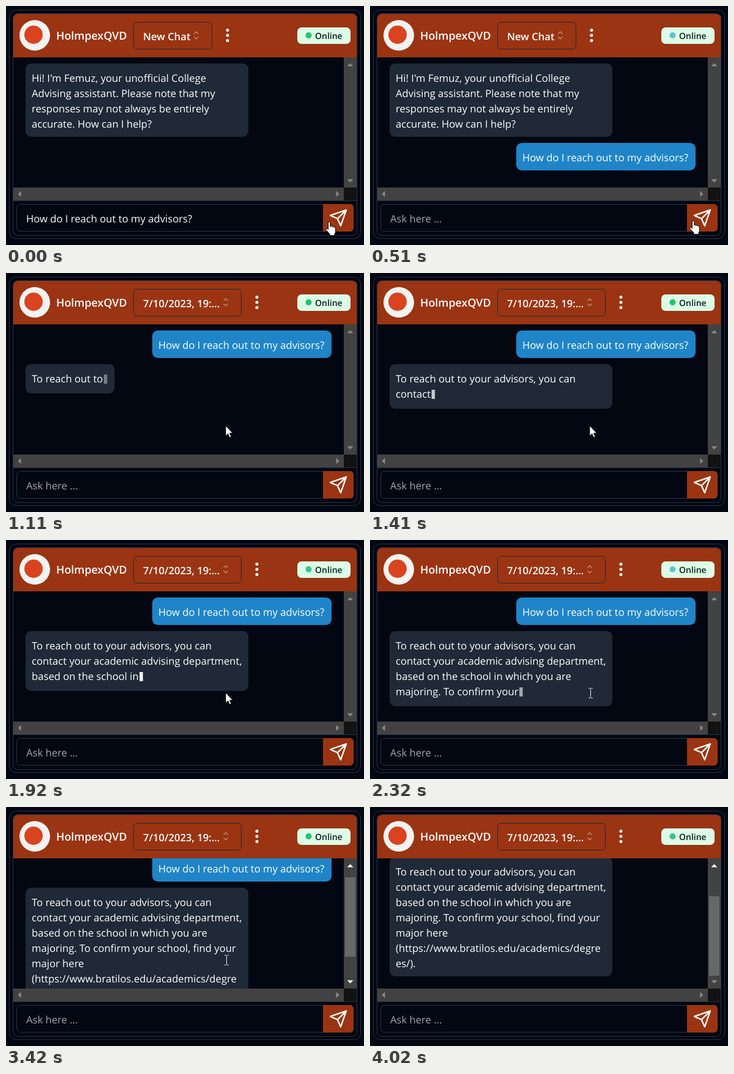
An HTML page for the animation above (4120 ms loop, 585 by 391 pixels).

```html
<!DOCTYPE html>
<html lang="en">
<head>
<meta charset="utf-8">
<title>Chat assistant</title>
<style>
  html, body { margin: 0; width: 100%; height: 100%; overflow: hidden; background: #030712; }
  svg { display: block; }
  text { font: 16.65px "Open Sans", "Noto Sans", sans-serif; fill: #fff; text-rendering: geometricPrecision; }
  .bold { font-weight: 600; }
  .line { fill: none; stroke: #283344; }
  .icon { fill: none; stroke: #fff; stroke-width: 1.8; stroke-linejoin: round; stroke-linecap: round; }
</style>
</head>
<body>
<svg width="585" height="391" viewBox="0 0 585 391">
  <defs>
    <clipPath id="view"><rect x="12" y="84" width="540" height="213"/></clipPath>
    <path id="tri" d="M-5 2.5L0-2.5 5 2.5z"/>
  </defs>
  <rect class="line" x="5.5" y="6.5" width="574" height="374" rx="11"/>

  <path d="M12 84V20a7 7 0 0 1 7-7H567a7 7 0 0 1 7 7V84z" fill="#9a3412"/>
  <circle cx="47" cy="48" r="25" fill="#f5f3f1"/>
  <circle cx="45" cy="47" r="15" fill="#d9431f"/>
  <text class="bold" x="82" y="55" style="font-size:17.9px">HolmpexQVD</text>
  <rect id="select" x="208.5" y="26.5" height="44" rx="6" fill="none" stroke="#1f2937"/>
  <text id="chatName" class="bold" x="224" y="55.5"></text>
  <g id="menu">
    <path d="M-4 45.5L-.5 42 3 45.5M-4 50.5L-.5 54 3 50.5" fill="none" stroke="#c49a8a" stroke-width="1.2"/>
    <g fill="#fff">
      <circle cx="50.5" cy="39.5" r="2.5"/><circle cx="50.5" cy="48" r="2.5"/><circle cx="50.5" cy="56.500" r="2.5"/>
    </g>
  </g>
  <rect x="476" y="35" width="87" height="27" rx="7" fill="#dcfce7"/>
  <circle id="dot" cx="494.5" cy="48" r="5"/>
  <text class="bold" x="505" y="53.5" style="font-size:14px;fill:#0b1f1a">Online</text>

  <g clip-path="url(#view)">
    <g id="messages">
      <g id="greeting">
        <rect x="32" y="94" width="364" height="120" rx="9" fill="#1f2937"/>
        <text id="greetingText"></text>
      </g>
      <g id="question">
        <rect x="239" y="94" width="293" height="45" rx="9" fill="#1f85c8"/>
        <text x="249" y="124">How do I reach out to my advisors?</text>
      </g>
      <g id="reply">
        <rect id="replyBox" x="32" y="149" rx="9"/>
        <text id="replyText"></text>
        <rect id="caret" width="5.5" height="15" fill="#fff"/>
      </g>
    </g>
  </g>

  <path d="M552 84h22V297H552zM12 297H552v21H12z" fill="#424242"/>
  <rect x="552" y="297" width="22" height="21" fill="#121212"/>
  <rect id="thumb" x="554" width="17" fill="#686868"/>
  <use id="up" href="#tri" x="562.5" y="96"/>
  <use id="down" href="#tri" transform="translate(562.5 286) rotate(180)"/>
  <g fill="#898989">
    <use href="#tri" transform="translate(22 307.5) rotate(-90)"/>
    <use href="#tri" transform="translate(542 307.5) rotate(90)"/>
  </g>

  <path class="line" d="M12 318.5H574"/>
  <rect class="line" x="17.5" y="324.5" width="550" height="44" rx="6"/>
  <text id="input" x="33" y="354"></text>
  <path d="M518 324h44a6 6 0 0 1 6 6v33a6 6 0 0 1-6 6h-44z" fill="#9a3412"/>
  <path class="icon" transform="translate(527.4 331) scale(1.3)" d="M22 2l-7 20-4-9-9-4zM22 2L11 13"/>
  <rect class="line" x="11.5" y="12.5" width="562" height="363" rx="8"/>

  <path id="hand" fill="#fff" stroke="#000" d="M4 13V2.5Q4 .5 5.7 .5T7.4 2.5V8q2-1 3 .6 2-.8 3 .8 2.6-.6 2.6 2v5q0 2-1.500 4V23H6.5V20.5L1 14.5Q-.8 12 .8 11.4 2 11 4 13z"/>
  <path id="arrow" fill="#fff" stroke="#000" stroke-width=".8" d="M0 0V16.5L3.8 13 6.4 19 9 18 6.4 12H11.5z"/>
  <path id="beam" fill="none" stroke="#eee" d="M357 242.5h2.5l1 1 1-1h2.500M360.5 243.5V257.5M357 258.5h2.5l1-1 1 1h2.500"/>
</svg>
<script>
const LOOP = 4120, LINE = 25, VIEW_BOTTOM = 297, VIEW_HEIGHT = 213, TRACK = 171;
const SEND = 310, NEW_CHAT = 710, SCROLL_START = 3320, POINTER_GONE = 3620;
const GREETING = [
  "Hi! I'm Femuz, your unofficial College",
  "Advising assistant. Please note that my",
  "responses may not always be entirely",
  "accurate. How can I help?"
];
const REPLY = [
  "To reach out to your advisors, you can",
  "contact your academic advising department,",
  "based on the school in which you are",
  "majoring. To confirm your school, find your",
  "major here",
  "(https://www.bratilos.edu/academics/degre",
  "es/)."
];
const tokens = REPLY.flatMap((line, row) =>
  line.match(/ ?[^ /]+\/*/g).map(word => ({ word, row })));

const GREEN = "#25c46c", TEAL = "#3ac48a", PALE = "#66c2cc";
const DOT_STEPS = [[0, GREEN], [110, TEAL], [310, PALE], [710, TEAL], [1010, GREEN],
  [1910, TEAL], [2120, PALE], [2820, TEAL], [3120, GREEN], [3920, TEAL]];

const $ = id => document.getElementById(id);
const set = (id, attrs) => {
  for (const name in attrs) $(id).setAttribute(name, attrs[name]);
};
const show = (id, on) => { $(id).style.display = on ? "" : "none"; };
const clamp = (v, lo, hi) => Math.min(hi, Math.max(lo, v));

function writeLines(id, lines, top) {
  $(id).replaceChildren(...lines.map((line, i) => {
    const span = document.createElementNS("http://www.w3.org/2000/svg", "tspan");
    span.setAttribute("x", 42);
    span.setAttribute("y", top + 30 + i * LINE);
    span.textContent = line;
    return span;
  }));
}

// The picture advances in steps of a tenth of a second.
function stepTime(t) {
  const offset = t >= 1800 ? 20 : 10;
  return Math.max(0, Math.floor((t - offset) / 100) * 100 + offset);
}

function drawHeader(t) {
  const started = t >= NEW_CHAT;
  set("select", { width: started ? 176 : 128 });
  $("chatName").textContent = started ? "7/10/2023, 19:…" : "New Chat";
  set("menu", { transform: `translate(${started ? 359.5 : 311.5})` });
  set("dot", { fill: DOT_STEPS.findLast(([start]) => t >= start)[1] });
}

// Draws the growing reply and returns its number of lines and its bottom edge.
function drawReply(t) {
  const count = clamp(Math.round(9 + (t - 1410) * 0.0174), 0, tokens.length);
  const done = count === tokens.length;
  const lines = [];
  for (const { word, row } of tokens.slice(0, count)) lines[row] = (lines[row] || "") + word;
  writeLines("replyText", lines, 149);

  const rows = Math.max(1, lines.length);
  const last = $("replyText").lastChild;
  const end = last ? last.getComputedTextLength() : 0;
  const height = 20 + rows * LINE + (done ? 0 : 3);
  set("replyBox", {
    width: rows > 1 ? 364 : Math.min(364, end + 29),
    height,
    fill: count ? "#1f2937" : "#1a2431"
  });
  const glow = (1 + Math.cos((t - 1800) / 1000 * Math.PI)) / 2;
  set("caret", { x: 43.5 + end, y: 166 + (rows - 1) * LINE, opacity: 0.22 + 0.78 * glow });
  show("caret", !done);
  return { rows, bottom: 149 + height };
}

function drawScroll(t, bottom) {
  const overflow = Math.max(0, bottom + 20 - VIEW_BOTTOM);
  const scroll = overflow * clamp((t - SCROLL_START) / 400, 0, 1);
  const ratio = TRACK / (VIEW_HEIGHT + overflow);
  set("messages", { transform: `translate(0 ${-Math.round(scroll)})` });
  set("thumb", { y: Math.round(105 + scroll * ratio), height: Math.round(VIEW_HEIGHT * ratio) });
  show("thumb", overflow > 0);
  set("up", { fill: scroll > 0 ? "#fff" : "#898989" });
  set("down", { fill: scroll < overflow ? "#fff" : "#898989" });
}

function drawPointer(t, rows) {
  const overText = rows >= 4;
  const moving = clamp((t - 610) / 200, 0, 1);
  const lift = 4 * clamp((t - 410) / 200, 0, 1);
  set("hand", { transform: `translate(522.5 ${352.5 - lift})` });
  set("arrow", { transform: `translate(${528 - 169 * moving} ${350 - 100 * moving})` });
  show("hand", !moving);
  show("arrow", moving && !overText);
  show("beam", overText && t < POINTER_GONE);
}

function draw(t) {
  const started = t >= NEW_CHAT, sent = t >= SEND;
  drawHeader(t);
  show("greeting", !started);
  show("question", sent);
  set("question", { transform: `translate(0 ${started ? 0 : 130})` });
  show("reply", started);
  const reply = started ? drawReply(t) : { rows: 0, bottom: 0 };
  drawScroll(t, reply.bottom);
  $("input").textContent = sent ? "Ask here ..." : "How do I reach out to my advisors?";
  $("input").style.fill = sent ? "#a8a0b4" : "#fff";
  drawPointer(t, reply.rows);
}

writeLines("greetingText", GREETING, 94);
const start = performance.now();
function tick() {
  draw(stepTime((performance.now() - start) % LOOP));
  requestAnimationFrame(tick);
}
tick();
</script>
</body>
</html>
```
